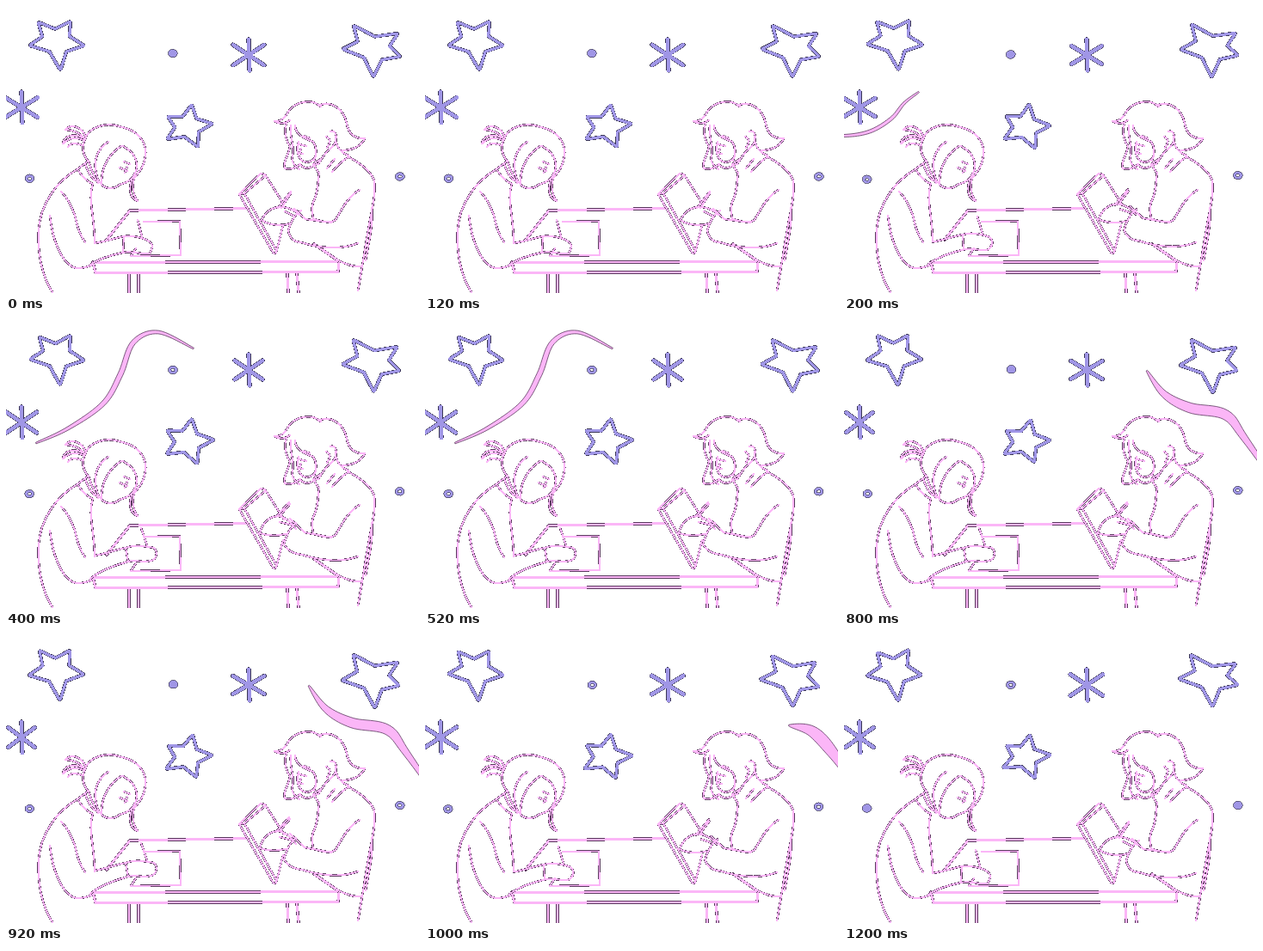
An HTML page for the animation above (1.4 s loop, 480 px wide and 334 px high).

```html
<!DOCTYPE html>
<html lang="en">
<head>
<meta charset="utf-8">
<title>Two people writing under the stars</title>
<style>
html, body { margin: 0; width: 100%; height: 100%; overflow: hidden; background: #fff; }
svg { display: block; width: 480px; height: 334px; shape-rendering: crispEdges; }
path { fill: none; stroke-linecap: round; stroke-linejoin: round; }
</style>
</head>
<body>
<svg id="stage" viewBox="0 0 480 334"></svg>
<script>
const STEP = 200, COUNT = 7;
const PINK = '#fbb6f7', PINK_EDGE = '#5c3a60';
const VIOLET = '#a096e6', VIOLET_EDGE = '#3c3858';

const path = (d, stroke, w, fill = 'none') =>
  `<path d="${d}" style="stroke:${stroke};stroke-width:${w};fill:${fill}"/>`;
const pink = (d, w = 1.8) => path(d, PINK_EDGE, w + .8) + path(d, PINK, w);
const violet = (d, w) => path(d, VIOLET_EDGE, w + 1) + path(d, VIOLET, w);

// Seeded value from -1 to 1
const noise = n => {
  const v = Math.sin(n * 127.1 + 3) * 43758.5;
  return (v - Math.floor(v)) * 2 - 1;
};

const leftPerson = `
M93 153C89 141 76 136 69 144C78 144 86 148 91 154M91 154C80 148 68 150 66 160
M67 160C74 152 83 153 90 156M72 164C77 157 84 161 89 162
M92 155C96 141 116 134 135 141C153 145 164 158 162 174C160 187 156 192 150 199
M92 155C87 164 90 175 96 181C99 190 102 198 107 206
M119 158C106 166 101 181 105 195C106 201 108 205 111 207
M134 163C121 171 110 187 111 208M136 163C150 171 154 180 151 193
M111 208C118 214 126 213 132 208C139 206 146 203 150 196
M152 191C143 204 140 222 153 227C147 219 146 210 149 200
M132 188L141 192M137 181L144 184M141 187L138 194
M96 180L83 190C88 198 94 204 101 207M92 183C94 191 98 198 103 203
M83 190C57 205 40 232 38 260C36 289 43 317 54 333
M64 216C73 225 80 240 82 252C84 261 87 268 92 275
M51 244C54 271 63 296 78 304C86 307 94 304 101 301
M101 207C95 224 103 246 103 274`;

const rightPerson = `
M312 134C319 135 325 130 328 123C334 114 345 110 357 112C361 113 363 115 366 117
M312 134C318 138 325 137 330 133
M363 116C378 109 393 120 396 137C398 149 406 155 417 154C413 163 403 168 391 168
M327 134C322 144 325 156 330 163C329 174 321 181 324 189C332 191 337 188 342 184
M331 139C329 152 336 164 333 174C331 181 336 187 341 190
M336 139C336 150 347 154 357 158C362 166 361 173 358 180
M340 158C337 166 339 175 344 180C351 184 357 180 360 175
M341 161L349 163M346 151L353 154M343 166L341 171L345 172
M383 152C383 164 390 171 398 174
M377 146C386 143 386 159 377 166C370 171 367 178 363 184M372 152C378 154 377 160 373 165
M341 184C349 192 354 188 361 184M366 178L357 184L364 195M398 176C389 181 383 188 379 193M382 178L373 189
M397 175C412 183 424 192 428 203C430 224 424 240 421 261C416 289 413 311 409 331
M425 235C427 257 421 276 418 296
M411 214C397 222 390 237 383 249C376 254 366 250 358 248
M364 194C362 207 363 216 358 226C354 234 356 241 357 247
M386 296C396 301 404 304 412 303`;

const table = `M117 272L144 238L281 235.500M101 298.500L384 297.500M101 298L104 310.500L386 309.500L387 297L358 277
M143 312V333M154 312V333M327 312L328 333M338 312L340 333`;
const book = `M271 219L296 195L301 196L323 231M271 219L311 288L314 287L322 255M277 218L314 284M277 218L301 198M271 219L277 218`;
const paper = 'M160 251L202 250.500L203 290L145 291L151 282';

// Writing arms: resting and raised, blended by lift
const leftArm = [
  `M103 276C116 274 127 270 137 268L136 287C121 290 108 294 98 301
   M137 268C146 267 158 269 165 273C172 278 171 280 167 288C157 290 147 284 136 287M153 249L158 268`,
  `M103 273C116 271 127 266 139 264L142 280C124 285 108 291 98 300
   M139 264C149 260 161 262 172 264C177 269 175 278 168 279C159 282 150 277 142 280M157 241L164 261`
];
const rightArm = [
  `M297 249C302 239 310 233 322 234C331 235 337 239 341 243M297 249C307 256 321 256 331 253M324 239L334 244
   M316 235L331 216M320 235L331 218M343 238C335 243 330 253 328 262M335 236L348 248
   M348 248L378 252M328 262C330 270 335 275 343 275C363 282 390 284 409 276`,
  `M295 247C297 237 305 227 317 227C327 229 333 236 337 242M295 247C304 250 316 250 325 248M318 234L331 237
   M314 228L329 211M318 227L330 213M337 235C329 241 325 252 323 260M330 230L347 246
   M347 246L378 252M323 260C327 267 334 271 344 272C363 278 389 282 409 274`
];
const lift = i => Math.min(1, (3 - Math.abs(i - 3)) / 2);

function blend([from, to], k) {
  const ends = to.match(/\d+/g);
  let n = 0;
  return from.replace(/\d+/g, v => +v + (ends[n++] - v) * k);
}

// A star from five tips; the notches lie between neighbours
function star(tips, seed) {
  const pts = tips.map((p, k) => p.map((v, a) => v + 1.2 * noise(seed + k * 2 + a)));
  const mix = (p, q, k) => p.map((v, a) => v + (q[a] - v) * k);
  const centre = [0, 1].map(a => pts.reduce((sum, p) => sum + p[a], 0) / 5);
  const line = pts.map((p, k) => {
    const notch = q => mix(centre, mix(p, q, .5), .62);
    const before = notch(pts[(k + 4) % 5]), after = notch(pts[(k + 1) % 5]);
    return `${mix(p, before, .1)}Q${p} ${mix(p, after, .1)}L${after}`;
  });
  return violet('M' + line.join('L') + 'Z', 3.2);
}

function spark([x, y], seed) {
  const dx = 17 + 2 * noise(seed), dy = 11.5 + noise(seed + 1);
  return violet(`M${x} ${y - 18}L${x + 1} ${y + 18}
    M${x - dx} ${y - dy}L${x + dx} ${y + dy}M${x + dx} ${y - dy}L${x - dx} ${y + dy}`, 4.2);
}

function dot([x, y], seed, solid) {
  const ring = (r, fill) => `<ellipse cx="${x + noise(seed) / 2}" cy="${y + noise(seed + 1)}" rx="${r + .6}" ry="${r}"
    fill="${fill}" stroke="${VIOLET_EDGE}" stroke-width=".7"/>`;
  return ring(4.8, VIOLET) + (solid ? '' : ring(1.6, '#fff'));
}

const stars = [
  [[38, 18], [75, 17], [91, 45], [63, 75], [27, 45]],
  [[216, 114], [241, 138], [222, 165], [186, 154], [188, 128]],
  [[403, 22], [455, 31], [458, 58], [428, 83], [390, 51]]
];
const sparks = [[18, 118], [282, 57]];
const dots = [[194, 56], [27, 201], [458, 198]];

// Ribbon crossing the sky: middle line and greatest width
const ribbons = {
  1: [4, [-30, 148], [0, 151], [30, 146], [55, 131], [70, 113], [87, 100]],
  2: [6, [35, 142], [72, 125], [113, 96], [133, 62], [148, 25], [177, 13], [218, 32]],
  3: [8, [122, 88], [160, 48], [195, 19], [241, 12], [300, 25], [331, 49], [338, 77], [374, 91]],
  4: [12, [352, 58], [372, 85], [402, 101], [443, 109], [466, 137], [520, 215]],
  5: [14, [423, 104], [450, 111], [474, 136], [500, 175]]
};

function ribbon([width, ...pts]) {
  const last = pts.length - 1, samples = last * 10;
  const at = t => {
    const k = Math.min(last - 1, Math.floor(t)), u = t - k;
    const b = pts[k], c = pts[k + 1], a = pts[k - 1] || b, d = pts[k + 2] || c;
    return [0, 1].map(n => b[n] + u / 2 * (c[n] - a[n] +
      u * (2 * a[n] - 5 * b[n] + 4 * c[n] - d[n] + u * (3 * (b[n] - c[n]) + d[n] - a[n]))));
  };
  const sides = [[], []];
  for (let s = 0; s <= samples; s++) {
    const t = s / 10, p = at(t);
    const q = at(Math.max(0, t - .05)), r = at(Math.min(last, t + .05));
    const angle = Math.atan2(r[1] - q[1], r[0] - q[0]);
    const half = .8 + (width / 2 - .8) * Math.sin(Math.PI * s / samples);
    [-1, 1].forEach((sign, n) =>
      sides[n].push([p[0] - sign * half * Math.sin(angle), p[1] + sign * half * Math.cos(angle)]));
  }
  return path('M' + sides[0].concat(sides[1].reverse()).join('L') + 'Z', PINK_EDGE, .8, PINK);
}

function scene(i) {
  const seed = i * 40;
  return '<g visibility="hidden">' +
    pink(table, 2.6) +
    pink(book + paper + leftPerson + rightPerson + blend(leftArm, lift(i)) + blend(rightArm, lift(i))) +
    stars.map((tips, n) => star(tips, seed + n * 10)).join('') +
    sparks.map((p, n) => spark(p, seed + 30 + n * 2)).join('') +
    dots.map((p, n) => dot(p, seed + 34 + n * 2, (i + 6) % COUNT % 3 === (n ? 2 : 0))).join('') +
    (ribbons[i] ? ribbon(ribbons[i]) : '') + '</g>';
}

const stage = document.getElementById('stage');
stage.innerHTML = Array.from({ length: COUNT }, (_, i) => scene(i)).join('');
const layers = [...stage.children];
const start = performance.now();

function tick(now) {
  const current = Math.floor(Math.max(0, now - start) / STEP) % COUNT;
  layers.forEach((layer, n) => layer.setAttribute('visibility', n === current ? 'visible' : 'hidden'));
  requestAnimationFrame(tick);
}
tick(start);
</script>
</body>
</html>
```
